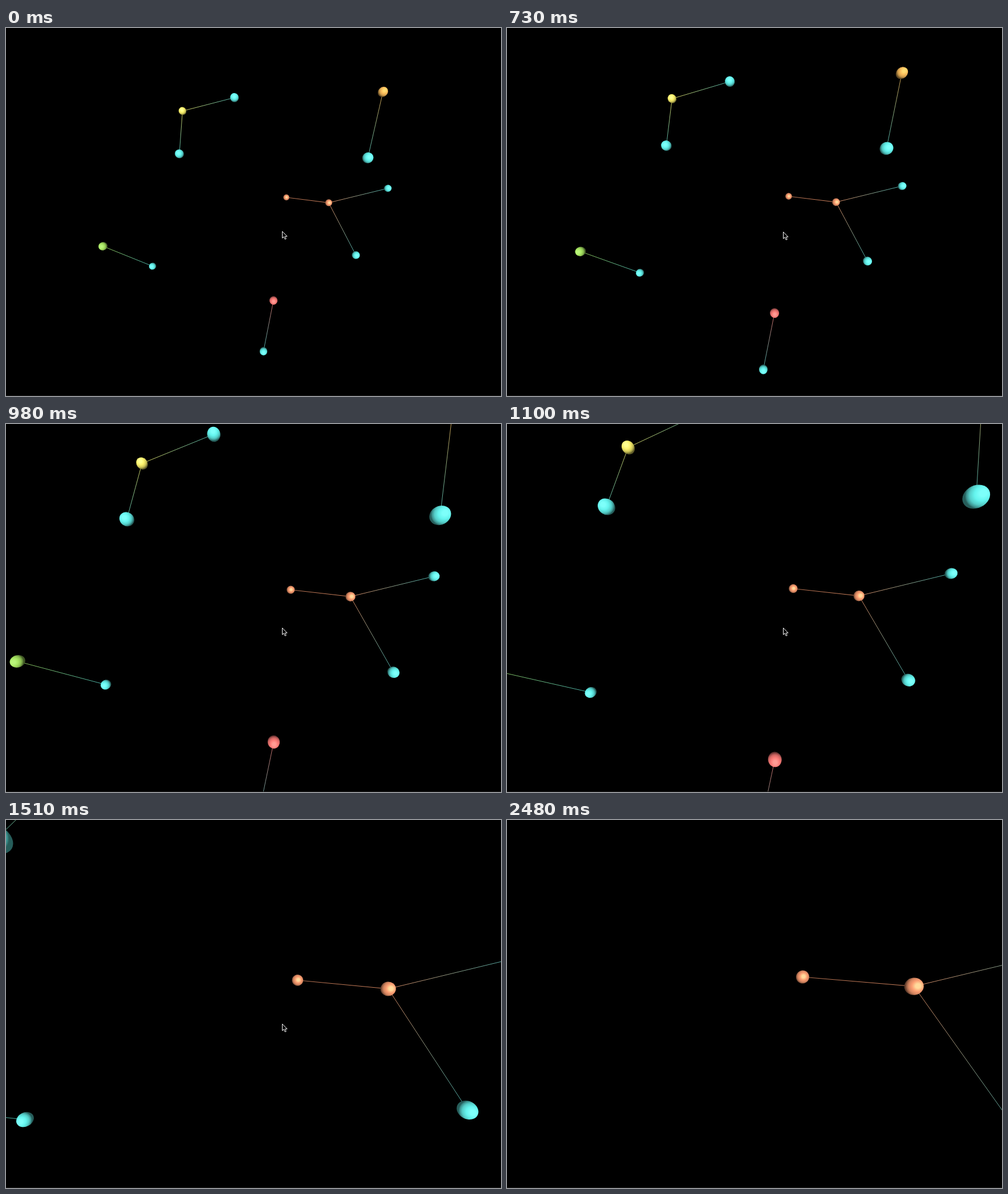
Write an HTML page with a canvas that moves like this. It is 868 px wide and 645 px high and loops after 3.67 s.

```html
<!DOCTYPE html>
<html lang="en">
<head>
<meta charset="utf-8">
<title>Flight through linked spheres</title>
<style>
  html, body { margin: 0; height: 100%; overflow: hidden; background: #000; }
  canvas { display: block; width: 100vw; height: 100vh; }
</style>
</head>
<body>
<canvas width="868" height="645"></canvas>
<script>
const ctx = document.querySelector('canvas').getContext('2d');
const LOOP = 3670;
const CENTRE = { x: 434, y: 322 };
const HEADING = { x: 468, y: 316 };   // point the camera flies towards
const FOCAL = 540;

const CYAN = { base: [100, 244, 238], glow: [125, 255, 250] };
const ORANGE = { base: [252, 158, 114], glow: [255, 218, 155] };
const YELLOW = { base: [252, 242, 108], glow: [255, 255, 145] };
const AMBER = { base: [252, 190, 92], glow: [255, 220, 115] };
const GREEN = { base: [168, 230, 98], glow: [186, 246, 122] };
const RED = { base: [252, 124, 120], glow: [255, 155, 148] };

// x, y: starting place on screen; near: inverse depth
const ball = (x, y, near, colour) => ({ x, y, near, colour });
const groups = [
  [ball(309.5, 145.5, .664, YELLOW), ball(400.5, 122, .749, CYAN), ball(304, 220.5, .772, CYAN)],
  [ball(661, 112, .829, AMBER), ball(634.5, 227.5, .928, CYAN)],
  [ball(565.8, 306.3, .602, ORANGE), ball(491.5, 296.9, .533, ORANGE),
    ball(669.5, 281, .615, CYAN), ball(613.5, 398, .669, CYAN)],
  [ball(170, 382.5, .718, GREEN), ball(257, 417.5, .6, CYAN)],
  [ball(469, 477.5, .71, RED), ball(451.5, 566.5, .666, CYAN)]
];

// time, distance and speed per second of the camera
const flight = [
  [590, 0, 1.2], [730, .168, 1.2], [980, .465, 1.01],
  [1220, .661, .74], [1510, .857, .59], [1790, 1, .45]
];

function travelled(t) {
  if (t < 620) return 0;
  if (t >= 1790) return 1;
  const i = flight.findIndex(knot => knot[0] > t);
  const [t0, d0, v0] = flight[i - 1], [t1, d1, v1] = flight[i];
  const span = (t1 - t0) / 1000, u = (t - t0) / (t1 - t0), w = 1 - u;
  return d0 * w * w * (1 + 2 * u) + d1 * u * u * (3 - 2 * u)
    + span * u * w * (v0 * w - v1 * u);
}

const rgb = (c, k = 1) => `rgb(${c.map(v => Math.round(v * k)).join()})`;

function project({ x, y, near, colour }, distance) {
  const zoom = 1 / (1 - near * distance);
  return {
    x: HEADING.x + (x - HEADING.x) * zoom,
    y: HEADING.y + (y - HEADING.y) * zoom,
    r: 10 * near * zoom,
    colour
  };
}

function drawLink(a, b) {
  const fade = ctx.createLinearGradient(a.x, a.y, b.x, b.y);
  fade.addColorStop(0, rgb(a.colour.base, .82));
  fade.addColorStop(1, rgb(b.colour.base, .7));
  ctx.strokeStyle = fade;
  ctx.lineWidth = 1;
  ctx.beginPath();
  ctx.moveTo(a.x, a.y);
  ctx.lineTo(b.x, b.y);
  ctx.stroke();
}

// Perspective stretches a sphere away from the centre; its lit side moves outwards too.
function drawBall({ x, y, r, colour }) {
  const dx = x - CENTRE.x, dy = y - CENTRE.y;
  const slope = Math.hypot(dx, dy) / FOCAL, stretch = Math.hypot(1, slope);
  const shift = .9 * r * slope / stretch;
  const shade = ctx.createRadialGradient(shift, 0, 0, shift, 0, shift + r / stretch);
  shade.addColorStop(0, rgb(colour.glow));
  shade.addColorStop(.2, rgb(colour.glow));
  shade.addColorStop(.48, rgb(colour.base));
  shade.addColorStop(.74, rgb(colour.base, .84));
  shade.addColorStop(.91, rgb(colour.base, .6));
  shade.addColorStop(1, rgb(colour.base, .38));
  ctx.save();
  ctx.translate(x, y);
  ctx.rotate(Math.atan2(dy, dx));
  ctx.scale(stretch, 1);
  ctx.fillStyle = shade;
  ctx.beginPath();
  ctx.arc(0, 0, r, 0, 2 * Math.PI);
  ctx.fill();
  ctx.restore();
}

const arrow = new Path2D('M.5 .5V12.2L3.2 9.8 5.2 14.3 7.2 13.4 5.3 9.2H9Z');

function drawCursor(t) {
  if (t >= 2480) return;
  const leave = Math.max(0, (t - 2190) / 290) ** 1.4;
  ctx.save();
  ctx.translate(484 + 330 * leave, (t < 390 ? 356 : 357) + 300 * leave);
  ctx.fillStyle = '#000';
  ctx.strokeStyle = '#fff';
  ctx.lineWidth = 1;
  ctx.fill(arrow);
  ctx.stroke(arrow);
  ctx.restore();
}

function draw(now) {
  const t = now % LOOP, distance = travelled(t);
  ctx.fillStyle = '#000';
  ctx.fillRect(0, 0, 868, 645);
  const visible = groups.map(group => group.map(b => project(b, distance)));
  for (const [hub, ...ends] of visible) ends.forEach(end => drawLink(hub, end));
  visible.flat().sort((a, b) => a.r - b.r).forEach(drawBall);
  ctx.fillStyle = '#1c1c1c';
  ctx.fillRect(0, 644, 868, 1);
  drawCursor(t);
}

const start = performance.now();
function tick() {
  draw(performance.now() - start);
  requestAnimationFrame(tick);
}
tick();
</script>
</body>
</html>
```
